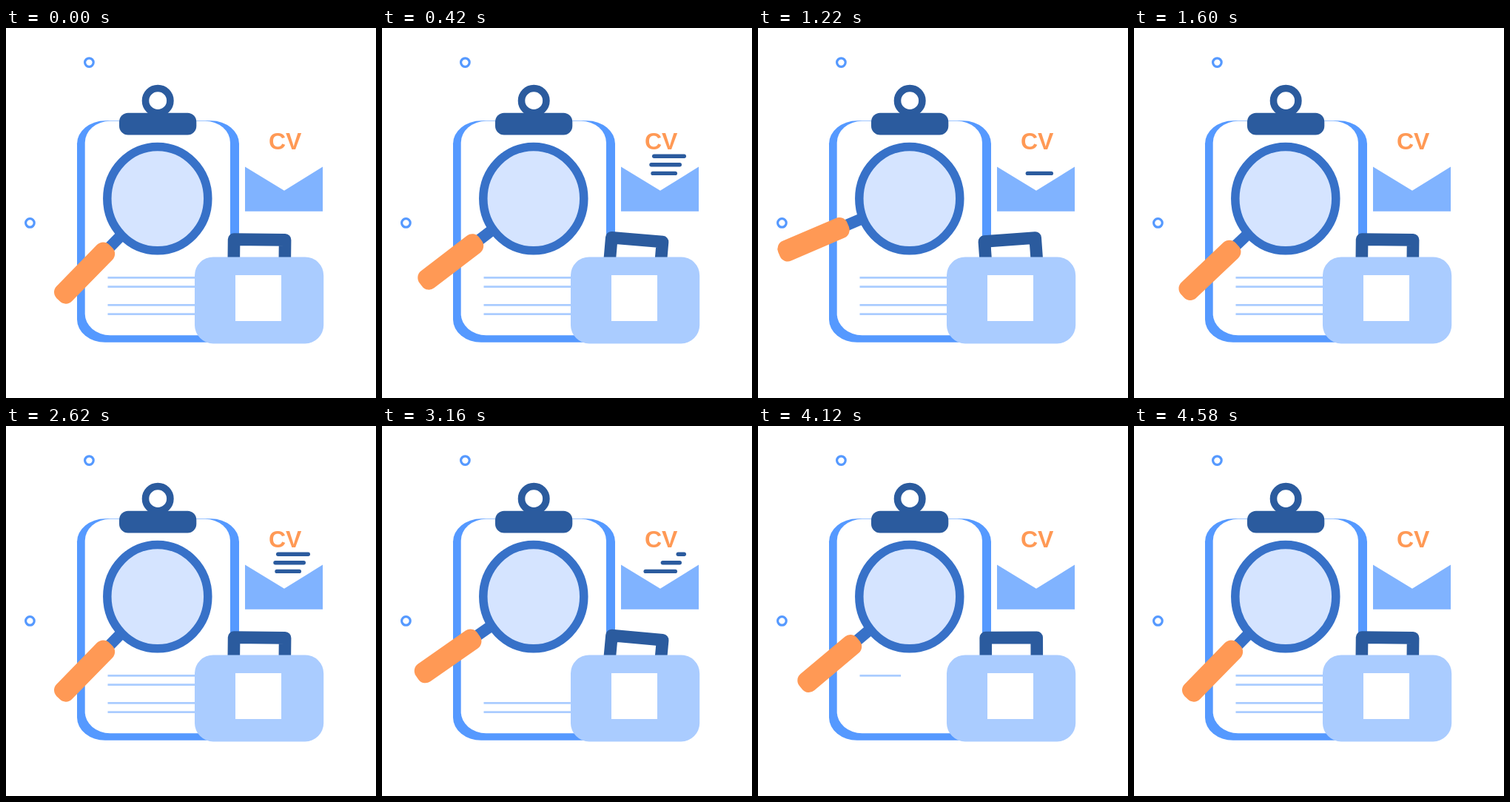
Animation, 500 px wide and 500 px high, one loop 5040 ms. Source, as an HTML page:

```html
<!DOCTYPE html>
<html lang="en">
<head>
<meta charset="utf-8">
<title>Job search</title>
<style>
  html, body { margin: 0; width: 100%; height: 100%; overflow: hidden; background: #fff; }
  svg { display: block; width: 100vw; height: 100vh; }
  text { font: bold 32px "Liberation Sans", Arial, sans-serif; }
</style>
</head>
<body>
<svg viewBox="0 0 500 500">
  <g fill="#fff" stroke="#5599ff" stroke-width="3.2">
    <circle cx="112.4" cy="46.6" r="5.8"/>
    <circle cx="32.4" cy="263.4" r="5.8"/>
  </g>

  <rect x="96" y="125.3" width="219" height="299.5" rx="38" ry="31" fill="#5599ff"/>
  <rect x="106.7" y="125.8" width="196.3" height="289.4" rx="34" ry="29" fill="#fff"/>
  <g id="rows" stroke="#aaccff" stroke-width="2.6"></g>

  <circle cx="205.2" cy="98.2" r="16.7" fill="#fff" stroke="#2b5b9e" stroke-width="9.6"/>
  <rect x="153" y="114.7" width="104.3" height="29.8" rx="12" fill="#2b5b9e"/>

  <g id="grip">
    <rect x="98" y="222.3" width="42" height="15.4" fill="#3771c8"/>
    <rect x="12.9" y="215.5" width="101.4" height="29" rx="11.5" fill="#ff9955"/>
  </g>
  <ellipse cx="204.8" cy="230.6" rx="68" ry="70.2" fill="#d5e4ff" stroke="#3771c8" stroke-width="11.5"/>

  <path d="M323 187.5L376 219.8L428 187.5V247.8H323Z" fill="#80b3ff"/>
  <text x="355" y="163.5" fill="#ff9955">CV</text>
  <g id="notes" stroke="#2b5b9e" stroke-width="5.4" stroke-linecap="round"></g>

  <path id="strap" d="M307.8 328V286H376.8V328" fill="none" stroke="#2b5b9e" stroke-width="16.6" stroke-linejoin="round"/>
  <rect x="255" y="309.4" width="174.2" height="117" rx="25" fill="#aaccff"/>
  <rect x="310" y="334" width="62" height="62" fill="#fff"/>
</svg>
<script>
const LOOP = 5040, HALF = 2660;
const $ = id => document.getElementById(id);
const unit = (t, a, b) => Math.min(1, Math.max(0, (t - a) / (b - a)));
const mix = (a, b, k) => a + (b - a) * k;
const sineOut = u => Math.sin(u * Math.PI / 2);
const sineInOut = u => (1 - Math.cos(u * Math.PI)) / 2;
const backIn = (u, s) => u * u * ((s + 1) * u - s);
const backOut = (u, s) => 1 - backIn(1 - u, s);

// quick departure followed by a long settle
function settle(u) {
  let lo = 0, hi = 1;
  for (let i = 0; i < 20; i++) {
    const s = (lo + hi) / 2;
    const x = 0.75 * (1 - s) * (1 - s) * s + s * s * s;
    if (x < u) lo = s; else hi = s;
  }
  return lo * lo * (3 - 2 * lo);
}

function addLine(parent, x1, x2, y) {
  const el = document.createElementNS("http://www.w3.org/2000/svg", "line");
  const at = { x1, x2, y1: y, y2: y };
  for (const k in at) el.setAttribute(k, at[k]);
  parent.appendChild(el);
  return el;
}

const rows = [
  { y: 337.4, out: 2830, back: 4060 },
  { y: 349.6, out: 2960, back: 4190 },
  { y: 374.4, out: 3160, back: 4320 },
  { y: 386.6, out: 3255, back: 4450 }
];
const ROW = { left: 137.5, right: 256 };
for (const r of rows) r.el = addLine($("rows"), ROW.left, ROW.right, r.y);

// out: start of the second exit; the first one is 2040 ms earlier
const notes = [
  { y: 173.3, left: 367.7, right: 408.3, out: 2753 },
  { y: 184.8, left: 364, right: 402.3, out: 2786 },
  { y: 196.4, left: 366, right: 396.3, out: 2942 }
];
for (const n of notes) n.el = addLine($("notes"), n.left, n.right, n.y);

function swing(t) {
  return t < 1200
    ? 22.5 * sineOut(unit(t, 180, 1200))
    : 22.5 * (1 - settle(unit(t, 1200, 1920)));
}

function tilt(t) {
  const keys = [[60, 0.6], [500, 5.2], [1080, -5.2], [1580, 0.6]];
  let v = keys[0][1];
  for (let i = 1; i < keys.length; i++) {
    const [a, from] = keys[i - 1], [b, to] = keys[i];
    if (t > a) v = mix(from, to, sineInOut(unit(t, a, b)));
  }
  return v;
}

function noteSize(t, n, i) {
  const second = t >= 2200;
  const start = (second ? 2290 : 50) + i * 40;
  const out = n.out - (second ? 0 : 2040);
  if (t < out) return t <= start ? 0 : backOut(unit(t, start, start + 220), 1.7);
  return 1 - backIn(unit(t, out, out + 430), 3.2);
}

function draw(t) {
  const phase = t < HALF ? t : t - HALF;
  $("grip").setAttribute("transform", `rotate(${swing(phase) - 45.6} 205 230)`);
  $("strap").setAttribute("transform", `rotate(${tilt(phase)} 342.3 314)`);

  notes.forEach((n, i) => {
    const k = noteSize(t, n, i);
    const cap = 2.7, full = n.right - n.left + 2 * cap;
    n.el.setAttribute("x1", Math.min(n.right, n.right + 2 * cap - full * k));
    n.el.style.display = k > 0.02 ? "" : "none";
  });

  for (const r of rows) {
    const k = t < 3700 ? 1 - unit(t, r.out, r.out + 105) : unit(t, r.back, r.back + 130);
    r.el.setAttribute("x2", mix(ROW.left, ROW.right, k));
    r.el.style.display = k > 0 ? "" : "none";
  }
}

const began = performance.now();
function tick() {
  draw((performance.now() - began) % LOOP);
  requestAnimationFrame(tick);
}
draw(0);
requestAnimationFrame(tick);
</script>
</body>
</html>
```
